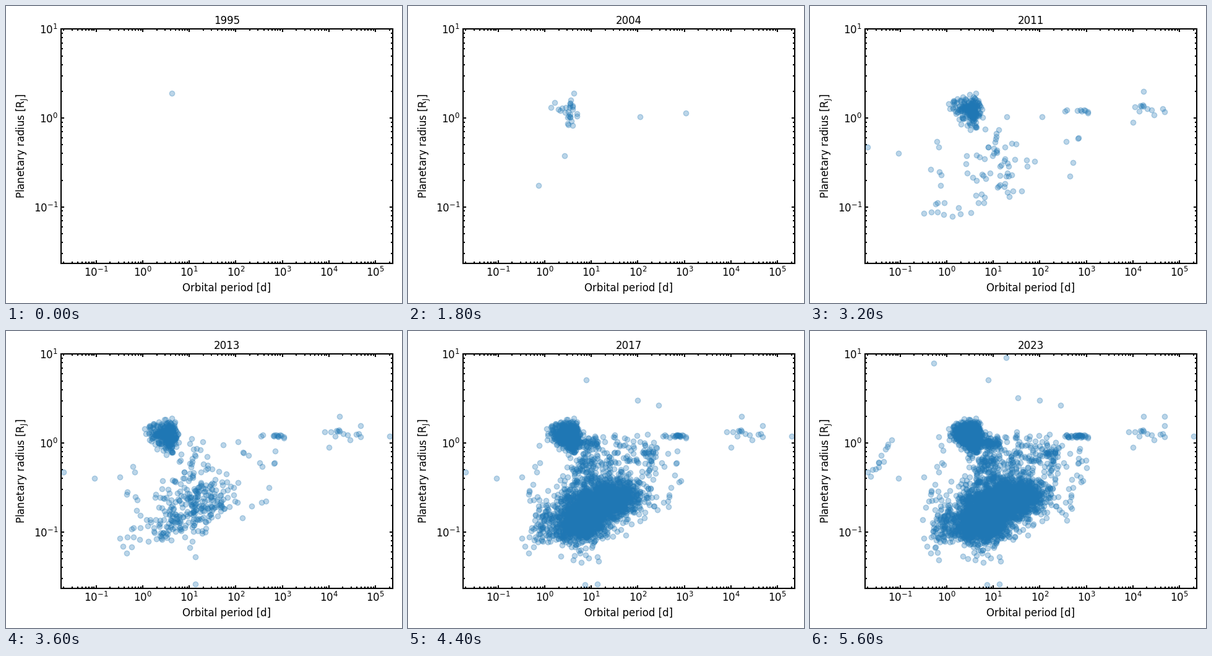
Recreate the animation shown at these times as a matplotlib script. Size 640 by 480 pixels, loop 5800 ms.

```python
import numpy as np
import matplotlib.pyplot as plt
from matplotlib.animation import FuncAnimation
from matplotlib.ticker import LogLocator, NullFormatter

W, H, DPI = 640, 480, 100
LEFT, RIGHT, TOP, BOTTOM = 89, 625, 37.3, 416
X0, Y0 = 221.05, 181.1       # stage position of 1 d and 1 R_J
DX, DY = 75.2, 143.7         # pixels per decade
YEARS = np.arange(1995, 2024)

rng = np.random.default_rng(51)


def period(x):
    return 10 ** ((x - X0) / DX)


def radius(y):
    return 10 ** ((Y0 - y) / DY)


# Notable planets: year, then stage position
NOTABLE = [
    (1995, 268, 141), (1996, 260, 178), (1996, 449, 173), (1999, 262, 161),
    (1999, 262, 180), (2000, 258, 180), (2001, 375, 179), (2004, 253, 242),
    (2004, 211, 290), (2006, 412, 170), (2007, 328, 299), (2007, 318, 179),
    (2010, 93, 228), (2010, 143, 238), (2011, 539, 138), (2012, 620, 170),
    (2013, 306, 409), (2014, 286, 410), (2016, 288, 79), (2016, 405, 120),
    (2017, 371, 112), (2018, 200, 52), (2018, 317, 43), (2018, 336, 108),
    (2019, 111, 213), (2020, 573, 138),
]

# Total number found by the end of a year, linear in between
HOT = {2001: 0, 2007: 46, 2011: 200, 2015: 390, 2019: 630, 2023: 790}
SURVEY = {2011: 0, 2013: 220, 2014: 980, 2015: 1120, 2016: 2250,
          2019: 2700, 2023: 3350}
EARLY = {2007: 0, 2011: 70, 2013: 90}
RECENT = {2015: 0, 2016: 50, 2023: 100}
STEADY = {2007: 0, 2011: 20, 2023: 100}

# Populations: growth, share, centre, spread, slope, cut-off in sigmas
GROUPS = [
    (HOT, 0.52, (264, 171), (6, 12), 0, 2.6),
    (HOT, 0.48, (252, 167), (12, 10), 0.1, 2.6),
    (RECENT, 0.7, (290, 180), (10, 7), 0.2, 2.4),
    (SURVEY, 0.42, (318, 273), (29, 16), -0.15, 2.8),
    (SURVEY, 0.36, (277, 308), (20, 17), -0.1, 2.8),
    (SURVEY, 0.20, (301, 281), (40, 29), -0.2, 2.6),
    (RECENT, 0.9, (218, 314), (13, 17), 0, 2.3),
    (EARLY, 0.8, (302, 260), (28, 32), 0, 2.2),
    (SURVEY, 0.03, (281, 212), (13, 18), 0, 2.2),
    (SURVEY, 0.03, (343, 193), (34, 18), 0, 2.0),
    (SURVEY, 0.014, (388, 208), (13, 20), 0, 2.0),
    (STEADY, 0.3, (430, 170), (17, 2), 0, 1.4),
    (STEADY, 0.3, (424, 240), (16, 36), -0.3, 2.0),
    (EARLY, 0.17, (545, 170), (40, 12), 0, 1.7),
    (EARLY, 0.14, (215, 335), (25, 18), 0, 2.0),
    (STEADY, 0.3, (203, 270), (14, 60), 0, 1.8),
    (SURVEY, 0.004, (277, 368), (20, 8), 0, 2.0),
]


def blob(n, centre, spread, slope, cut):
    z = rng.normal(size=(4 * n + 20, 2))
    z = z[np.hypot(*z.T) < cut][:n] * spread
    z[:, 1] += slope * z[:, 0]
    return z + centre


def found(growth, share):
    totals = np.interp(YEARS, list(growth), list(growth.values())) * share
    return np.diff(np.round(totals).astype(int), prepend=0)


def catalogue():
    parts = [np.array(NOTABLE, float)]
    for growth, share, *shape in GROUPS:
        years = np.repeat(YEARS, found(growth, share))
        parts.append(np.column_stack([years, blob(len(years), *shape)]))
    # A short diagonal trail of very short periods
    t = np.linspace(0, 1, 11)
    parts.append(np.column_stack([2020 + np.arange(11) % 4,
                                  99 + 33 * t + rng.normal(0, 2, 11),
                                  232 - 54 * t + rng.normal(0, 3, 11)]))
    planets = np.vstack(parts)
    return planets[np.argsort(planets[:, 0], kind="stable")].T


year, x, y = catalogue()
periods, radii = period(x), radius(y)
totals = np.searchsorted(year, YEARS, side="right")

fig = plt.figure(figsize=(W / DPI, H / DPI), dpi=DPI)
ax = fig.add_axes([LEFT / W, 1 - BOTTOM / H,
                   (RIGHT - LEFT) / W, (BOTTOM - TOP) / H])
ax.set_xscale("log")
ax.set_yscale("log")
ax.set_xlim(period(LEFT), period(RIGHT))
ax.set_ylim(radius(BOTTOM), radius(TOP))
for axis in (ax.xaxis, ax.yaxis):
    axis.set_major_locator(LogLocator(numticks=20))
    axis.set_minor_locator(LogLocator(subs=range(2, 10), numticks=20))
    axis.set_minor_formatter(NullFormatter())
ax.tick_params(which="both", direction="in", top=True, right=True,
               width=1.5, labelsize=12)
for spine in ax.spines.values():
    spine.set_linewidth(1.5)
ax.set_xlabel("Orbital period [d]", fontsize=12)
ax.set_ylabel(r"Planetary radius [R$_\mathrm{J}$]", fontsize=12)
title = ax.set_title(str(YEARS[0]), fontsize=12)
dots, = ax.plot([], [], "o", color="#1f77b4", ms=6, alpha=0.3)


def update(i):
    n = totals[i]
    dots.set_data(periods[:n], radii[:n])
    title.set_text(str(YEARS[i]))
    return dots, title


anim = FuncAnimation(fig, update, frames=len(YEARS), interval=200,
                     repeat=True, repeat_delay=0)
plt.show()
```
